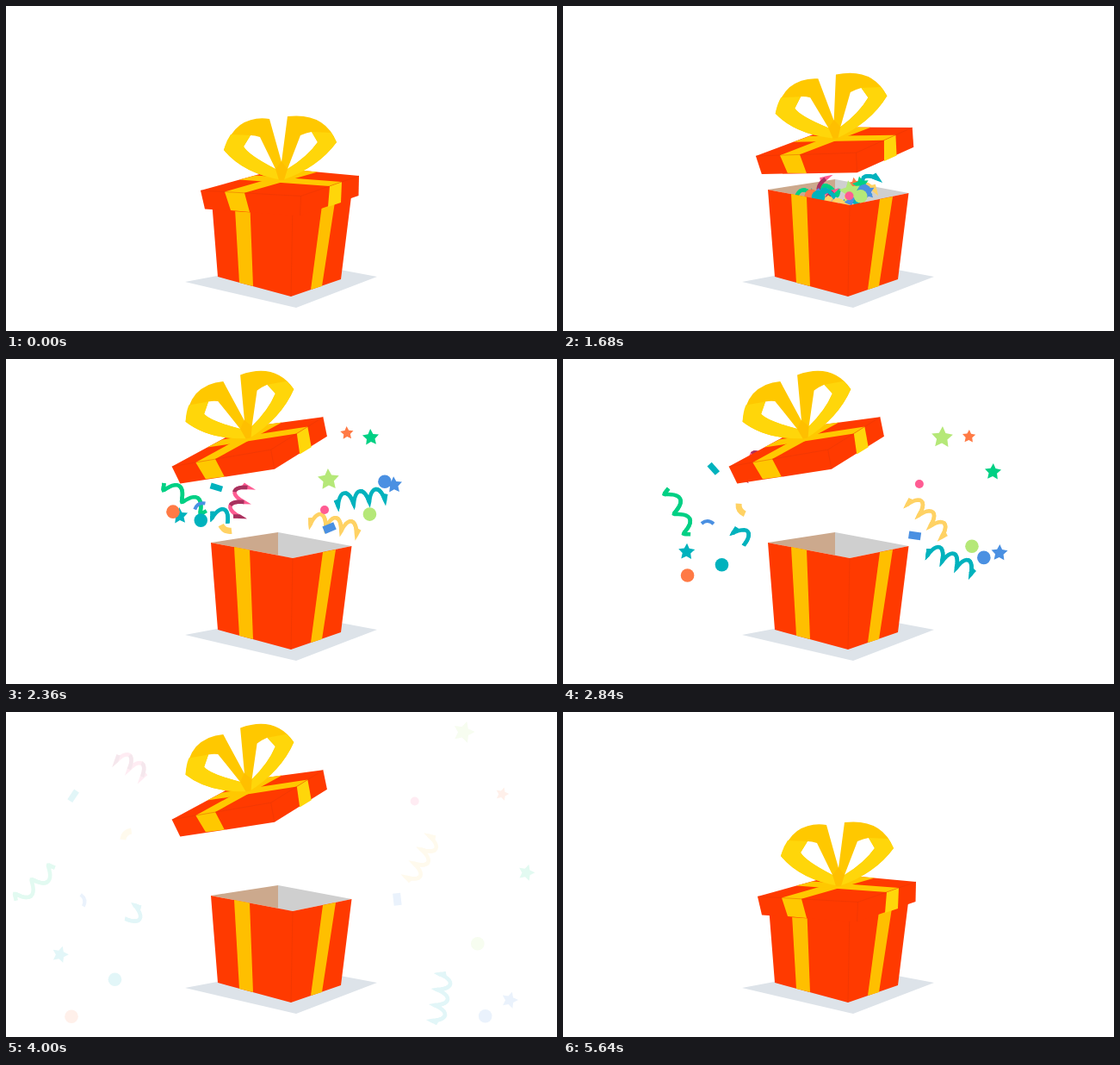
Animation, 640 px wide and 377 px high, one loop 6.64 s. Source, as an HTML page:

```html
<!DOCTYPE html>
<html lang="en">
<head>
<meta charset="utf-8">
<title>Gift box</title>
<style>
  html, body { margin: 0; width: 100%; height: 100%; overflow: hidden; background: #fff; }
  svg { display: block; width: 100%; height: 100%; }
  .red { fill: #ff3a00; }
  .ribbon { fill: #ffbf00; }
  .bow { fill: #ffc800; }
  .light { fill: #ffd60a; }
  .edge { fill: none; stroke: #dc3508; stroke-width: .7; opacity: .5; }
</style>
</head>
<body>
<svg viewBox="0 0 640 377">
  <path fill="#dde3e9" d="M208 320L337 350L431 314L391 306.5L310 301Z"/>
  <path fill="#cca98d" d="M238 213L316 201V228L333 231Z"/>
  <path fill="#cfcfcf" d="M316 201L401.5 217L333 231L316 228Z"/>

  <g id="confetti"></g>

  <g id="body">
    <path class="red" d="M238 213L333 231L401.5 217L389 317L331 337L246 314Z"/>
    <path class="ribbon" d="M265 218L283 221.5L287 325L271 321Z"/>
    <path class="ribbon" d="M368 224L383 221L367 325L354 329Z"/>
    <path class="edge" d="M333 231L331 337"/>
  </g>

  <g id="lid">
    <path class="red" d="M226 214L318 188.5L410 197L409.5 220L341.5 243.5L231 235.5Z"/>
    <path class="bow" d="M254 215.6L341 190.6L362 192.5L277 216.8L283 239L261 237Z"/>
    <path class="bow" d="M271 201.6L290 196.5L390 204L376 209Z"/>
    <path class="light" d="M390 204L389 228L374 233L376 209Z"/>
    <path class="edge" d="M226 214L342.5 220.5L410 197M342.5 220.5L341.5 243"/>
    <path class="bow" fill-rule="evenodd" d="M321 202Q275 194 253 167Q260 147 272 138Q287 128 306 131L320 181ZM276 163Q280 172 313 189L295 152Q289 150 284 150Z"/>
    <path class="light" d="M253 167Q256 156 261 149L284 150L276 163Q282 173 313 189L321 202Q275 194 253 167Z"/>
    <path class="bow" fill-rule="evenodd" d="M319 202L320 181L327 128Q370 123 384 158Q362 188 319 202ZM327 189Q350 175 362 158L355 146Q349 147 342 150Z"/>
    <path class="light" d="M355 146L378 147L384 158Q362 188 321 202L327 189Q350 175 362 158Z"/>
    <path class="ribbon" d="M313 189L320 180L327 189L323 202H317Z"/>
  </g>
</svg>

<script>
const LOOP = 6640;
const GREEN = '#00d084', TEAL = '#00b2bd', ORANGE = '#ff7a45', LIME = '#b5e878',
      BLUE = '#4a90e2', PINK = '#ff5c93', PLUM = '#a8325f', YELLOW = '#ffd264';
const confetti = document.getElementById('confetti');
const lid = document.getElementById('lid');

const clamp = v => Math.min(1, Math.max(0, v));

function ease(p) {
  p = clamp(p);
  return .7 * (1 - Math.cos(Math.PI * p)) / 2 + .3 * p;
}

function add(parent, tag, attrs) {
  const el = document.createElementNS('http://www.w3.org/2000/svg', tag);
  for (const key in attrs) el.setAttribute(key, attrs[key]);
  return parent.appendChild(el);
}

const polar = (r, a) => `${(r * Math.cos(a)).toFixed(2)},${(r * Math.sin(a)).toFixed(2)}`;

// Each kind of confetti has its drawing, its angle when spread out and its spin per second.
const dot = (fill, r = 7.8) => ({ rest: 0, spin: 0, draw: g => add(g, 'circle', { r, fill }) });

const star = (fill, r = 10) => ({
  rest: 9, spin: 12,
  draw(g) {
    const points = Array.from({ length: 10 }, (_, i) => polar(i % 2 ? r / 2 : r, (i / 5 - .5) * Math.PI));
    add(g, 'polygon', { points: points.join(' '), fill });
  }
});

const strip = (stroke, rest, bend = 0, width = 7) => ({
  rest, spin: 65,
  draw: g => add(g, 'path', { d: `M-7 0Q0 ${bend} 7 0`, fill: 'none', stroke, 'stroke-width': width })
});

// A curled wave along the x axis; the back colour shows on every second half turn.
const streamer = (stroke, rest, turns = 3.5, length = 64, back = stroke) => ({
  rest, spin: 65,
  draw(g) {
    const steps = turns * 16;
    const points = Array.from({ length: steps + 1 }, (_, i) => {
      const a = i / steps * turns * 2 * Math.PI;
      return [length * (i / steps - .5) + 2.5 * Math.cos(a), 7 * Math.sin(a)].map(v => v.toFixed(2));
    });
    const line = { points: points.join(' '), fill: 'none', 'stroke-width': 4.5, pathLength: turns * 2 };
    add(g, 'polyline', { ...line, stroke });
    add(g, 'polyline', { ...line, stroke: back, 'stroke-dasharray': 1, 'stroke-dashoffset': .5 });
  }
});

// kind, point where it is spread out, height at the burst
const pieces = [
  [streamer(GREEN, 98, 2.5), 77, 190, 160],
  [streamer(PINK, -8, 2.5, 44, PLUM), 177, 86, 164],
  [streamer(TEAL, 85, 1.25, 24), 175, 221, 180],
  [streamer(TEAL, 58), 483, 290, 160],
  [streamer(YELLOW, 78), 459, 176, 191],
  [strip(TEAL, 82), 119, 110, 149],
  [strip(BLUE, 35, -6, 4), 122, 207, 171],
  [strip(YELLOW, 93, 5), 169, 156, 196],
  [strip(BLUE, 42, 0, 9), 435, 212, 196],
  [star(TEAL), 97, 257, 182],
  [star(ORANGE, 8), 532, 93, 86],
  [star(GREEN), 560, 163, 91],
  [star(LIME, 13), 493, 52, 140],
  [star(BLUE), 552, 288, 146],
  [dot(ORANGE), 105, 310, 177],
  [dot(TEAL), 151, 280, 187],
  [dot(BLUE), 528, 301, 142],
  [dot(PINK, 5), 449, 121, 175],
  [dot(LIME), 517, 247, 180]
].map(([kind, x, y, burstY]) => {
  const g = add(confetti, 'g', {});
  kind.draw(g);
  // Pieces that sink lower have already flown farther out at the burst.
  const burstX = 320 + (x - 320) * (.26 + .00105 * y);
  return { ...kind, g, x, y, burstX, burstY };
});

// Slowing drift away from the burst; before it, an arc out of the box.
function travel(start, from, to, s) {
  const speed = 1.3 * (to - from);
  const bend = s < 0 ? (start - from + .68 * speed) / .68 ** 2 : -.3 * (to - from);
  return from + speed * s + bend * s * s;
}

function drawLid(t) {
  const lift = ease((t - 1380) / 660) - ease((t - 4760) / 880);
  const x = 318 - 37.5 * lift ** 3, y = 205.5 - 109.5 * lift;
  const angle = -12.8 * (.9 * lift + .1 * lift ** 8);
  lid.setAttribute('transform', `translate(${x} ${y}) rotate(${angle}) translate(-318 -205.5)`);
}

function drawConfetti(t) {
  const visible = t > 1500 && t < 4040;
  confetti.setAttribute('visibility', visible ? 'visible' : 'hidden');
  if (!visible) return;
  confetti.setAttribute('opacity', clamp((4040 - t) / 340));
  const s = (t - 2360) / 1000;
  for (const p of pieces) {
    const x = travel(320 + (p.burstX - 320) / 4, p.burstX, p.x, s);
    const y = travel(194 + p.burstY * .15, p.burstY, p.y, s);
    p.g.setAttribute('transform', `translate(${x} ${y}) rotate(${p.rest + p.spin * (s - 1)})`);
  }
}

const begin = performance.now();
function frame() {
  const t = (performance.now() - begin) % LOOP;
  drawLid(t);
  drawConfetti(t);
  requestAnimationFrame(frame);
}
frame();
</script>
</body>
</html>
```
